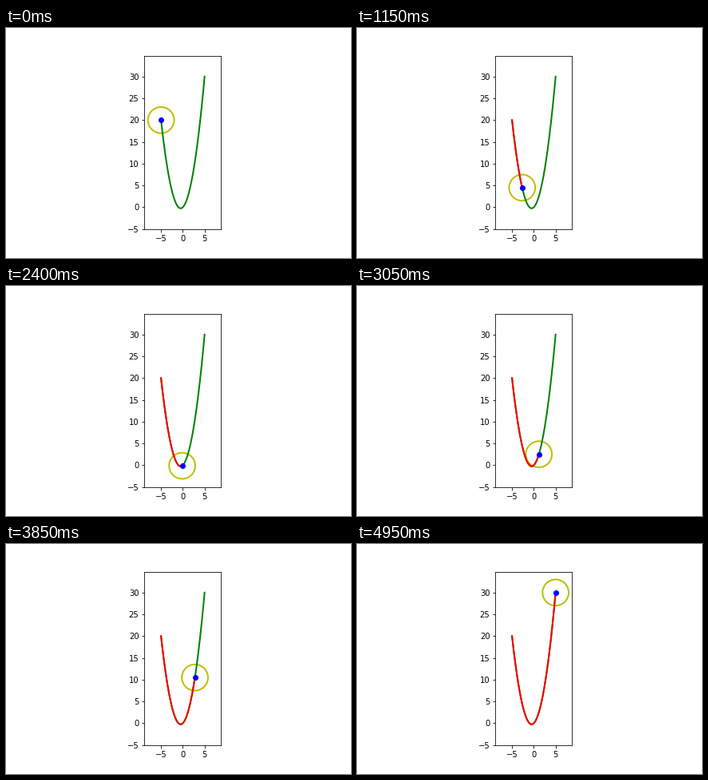
Write a matplotlib script that moves like this. It is 432 px wide and 288 px high and loops after 5 s.

```python
import numpy as np
import matplotlib.pyplot as plt
from matplotlib.animation import FuncAnimation

FRAMES = 100
INTERVAL = 50
RADIUS = 3

x = np.linspace(-5, 5, FRAMES)
y = x**2 + x


def padded(low, high, margin=0.05):
    pad = margin * (high - low)
    return low - pad, high + pad


plt.rcParams.update({"font.family": "DejaVu Sans", "font.size": 10})
fig, ax = plt.subplots(figsize=(6, 4), dpi=72)
fig.subplots_adjust(left=0.125, right=0.9, bottom=0.125, top=0.88)

# Limits leave room for the ring along the whole path.
ax.set_aspect("equal")
ax.set_xlim(*padded(x.min() - RADIUS, x.max() + RADIUS))
ax.set_ylim(*padded(y.min() - RADIUS, y.max() + RADIUS))
ax.set_xticks(range(-5, 6, 5))
ax.set_yticks(range(-5, 31, 5))

ax.plot(x, y, "g", lw=2)
trail, = ax.plot([], [], "r", lw=2)
dot, = ax.plot([], [], "bo", ms=6)
ring = ax.add_patch(plt.Circle((x[0], y[0]), RADIUS, fill=False, ec="y", lw=2))


def update(i):
    trail.set_data(x[:i + 1], y[:i + 1])
    dot.set_data([x[i]], [y[i]])
    ring.center = x[i], y[i]
    return trail, dot, ring


anim = FuncAnimation(fig, update, frames=FRAMES, interval=INTERVAL,
                     repeat=True, repeat_delay=0)
plt.show()
```
